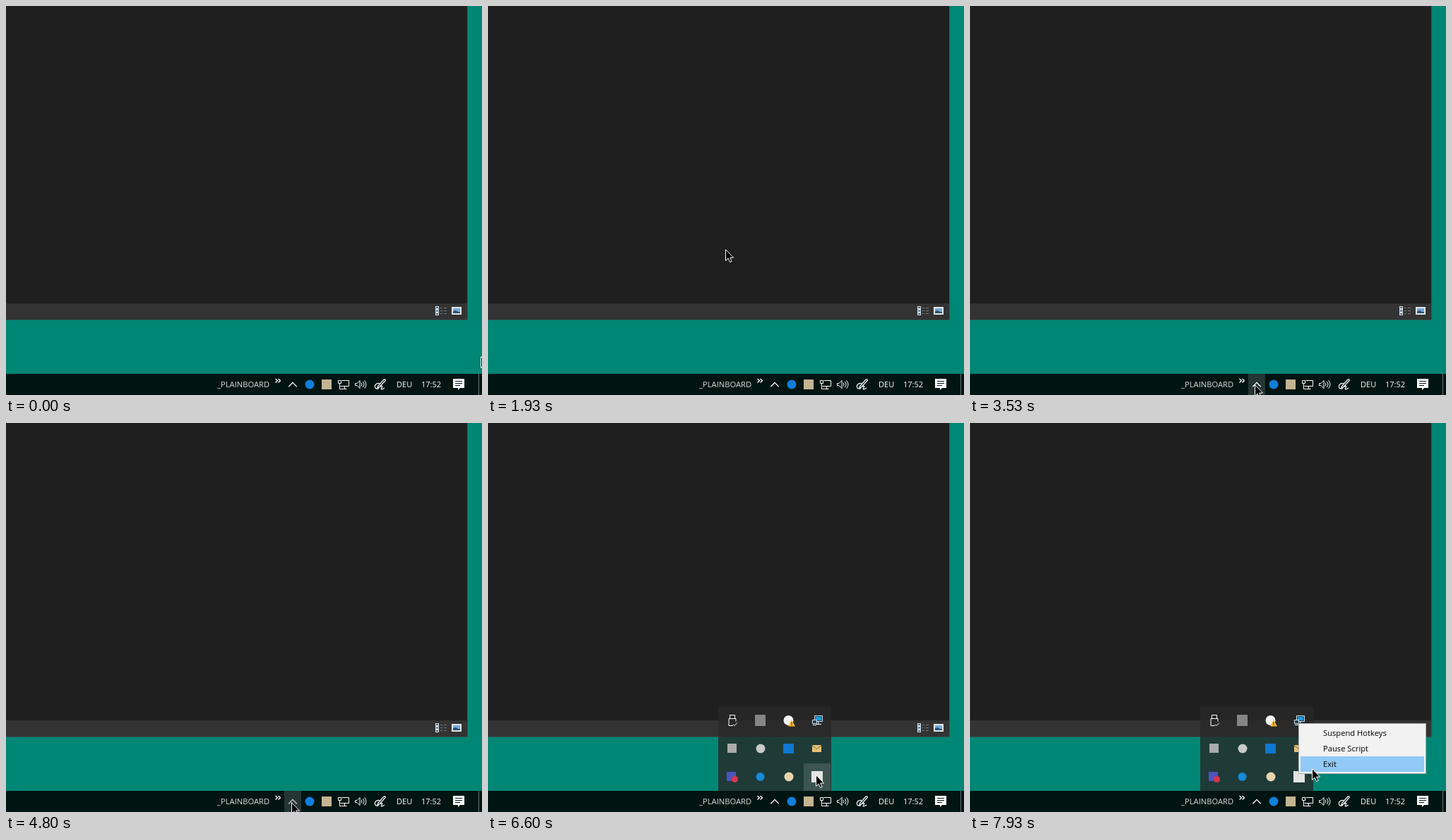
An HTML page that plays this animation: 674 px wide and 552 px high, repeating every 8000 ms.

```html
<!DOCTYPE html>
<html lang="en">
<head>
<meta charset="utf-8">
<title>Closing a script from the tray</title>
<style>
  html, body { margin: 0; width: 100%; height: 100%; overflow: hidden; background: #008675; }
  svg { display: block; }
  text { font: 11.2px "Open Sans", "Noto Sans", sans-serif; }
  rect { shape-rendering: crispEdges; }
  .line { fill: none; stroke: #fff; }
</style>
</head>
<body>
<svg width="674" height="552" viewBox="0 0 674 552">
  <!-- application window -->
  <rect width="653" height="422" fill="#1f1f1f"/>
  <rect y="422" width="653" height="23" fill="#333"/>
  <path d="M0 445.5H653.5V0" fill="none" stroke="#2d5c54"/>
  <g id="viewIcons">
    <path d="M608 426h5v13h-5z" fill="#d9d9d9"/>
    <path d="M609 428h3m-3 4.5h3m-3 4.5h3" stroke="#416f9b" stroke-width="2"/>
    <path d="M615 428.5h3m2 0h4m-9 4h3m2 0h4m-9 4h3m2 0h4" stroke="#777"/>
    <rect x="631" y="427" width="14" height="11" fill="#e6e6e6"/>
    <rect x="633" y="429" width="10" height="7" fill="#75a9dc"/>
    <path d="M633 436v-3l4-1 3 2h3v2z" fill="#245273"/>
  </g>

  <!-- taskbar -->
  <rect y="522" width="674" height="30" fill="#001412"/>
  <rect id="chevronHover" x="394" y="522" width="24" height="30" fill="#fff"/>
  <text x="299" y="541" fill="#dcdcdc">_PLAINBOARD</text>
  <path class="line" d="M381.5 529l3 2.7-3 2.8m4-5.5l3 2.7-3 2.8" stroke-width="1.3"/>
  <path id="chevron" class="line" d="M400.3 540.2l5.7-5.8 5.7 5.8" stroke-width="1.3"/>
  <circle cx="430" cy="537" r="6.5" fill="#0f7fdb"/>
  <rect x="447" y="530" width="14" height="14" fill="#c3b492"/>
  <path class="line" d="M475.5 531.5h10v8h-12M479.5 540v3.5m-4 0h7M470.5 531.5h4v4h-4zM472.5 536v7.5h3"/>
  <path class="line" d="M494.5 535.5h2.5l4-4v11l-4-4h-2.5zM503 534.7q2 2.3 0 4.6M505.3 533q3.4 4 0 8M507.6 531.3q4.8 5.7 0 11.4"/>
  <path class="line" d="M527 539l8-9q2-1 2.3 1.2L529 540.5l-3 1zM529 535.5c-5-1-8 3-6 6.500c2 2 5 1 5-.5m2-1c2-2 4-1 2 1-2 3 0 3 4 .5" stroke-width="1.2"/>
  <text x="553" y="541" fill="#fff" style="font-size:11px">DEU</text>
  <text x="588" y="541" fill="#fff" style="font-size:11px">17:52</text>
  <path d="M633 529h16v13h-6l-3 3v-3h-7z" fill="#fff"/>
  <path d="M636 532.500h10m-10 3h10m-10 3h7" stroke="#001412"/>
  <rect x="669" y="522" width="1" height="30" fill="#687572"/>

  <!-- hidden icons -->
  <g id="flyout">
    <rect x="326" y="402" width="160" height="120" fill="#282828" fill-opacity=".79"/>
    <rect id="cellHover" x="447" y="483" width="38" height="39" fill="#fff" fill-opacity=".13"/>
    <path class="line" d="M342.500 419.500v-5h7v5m-8.500 0h10v4m-10-4v10h6m0-2l2 2 4-4m-8-11h.9m1.200 0h.9"/>
    <rect x="378" y="414" width="15" height="16" fill="#858585"/>
    <circle cx="425.500" cy="422" r="7" fill="#f4f4f4"/>
    <path d="M430 421l5 9.500h-10z" fill="#f6b928"/>
    <path d="M430 424.500v3m0 .8v1" stroke="#333"/>
    <path d="M462.500 415.500h11v8h-11z" fill="#123d61" stroke="#dce6ee"/>
    <path d="M464 417h8v5h-8z" fill="#259bdc"/>
    <path d="M459.500 421.500h6v5h-6z" fill="#17405e" stroke="#dce6ee"/>
    <path d="M468 424v3.500m-3 0h7m-12 1h5" class="line"/>
    <rect x="339" y="455" width="13" height="13" fill="#aaa"/>
    <circle cx="386" cy="462" r="6.500" fill="#c9c9c9"/>
    <rect x="418" y="455" width="15" height="14" fill="#0f78d0"/>
    <path d="M459 457h13v10h-13z" fill="#e5c177"/>
    <path d="M459 457.500l6.500 5 6.500-5" fill="none" stroke="#755b28"/>
    <rect x="338" y="495" width="13" height="13" fill="#4c54bd"/>
    <circle cx="349.500" cy="505.500" r="4.500" fill="#d9344b"/>
    <circle cx="385.500" cy="502" r="6" fill="#168bd8"/>
    <circle cx="426" cy="502" r="6.500" fill="#ead4ad"/>
    <rect x="458" y="494" width="16" height="16" fill="#e4e4e4"/>
  </g>

  <g id="menu">
    <rect x="465" y="426" width="181" height="72" fill="#a9aeac"/>
    <rect x="466" y="427" width="179" height="70" fill="#f2f2f2"/>
    <rect id="exitHover" x="468" y="473" width="175" height="22" fill="#91c9f7"/>
    <text x="500" y="444">Suspend Hotkeys</text>
    <text x="500" y="466">Pause Script</text>
    <text x="500" y="488">Exit</text>
  </g>

  <path id="cursor" d="M.5.7v15.800l3.600-3.400 2.400 5.400 2.600-1.100-2.400-5.300h4.900z" fill="#000" stroke="#fff"/>
</svg>
<script>
  const LOOP = 8000, FPS = 15;
  const el = id => document.getElementById(id);
  const clamp = v => Math.max(0, Math.min(1, v));

  // Pointer tip: [tick, x, y]
  const path = [
    [1, 672, 497], [5, 508, 396], [9, 400, 329], [14, 400, 329],
    [15, 396, 326], [19, 368, 377], [20, 368, 377], [27, 341, 337],
    [29, 336, 345], [38, 415, 531], [40, 421, 539], [41, 420, 542],
    [43, 420, 542], [47, 404, 532], [51, 404, 532], [54, 403, 539],
    [60, 403, 539], [61, 404, 538], [82, 404, 538], [90, 429, 515],
    [95, 450, 508], [99, 464, 499], [115, 464, 499], [119, 484, 490]
  ];

  function pointer(k) {
    const i = path.findIndex(p => p[0] >= k);
    if (i < 0) return path.at(-1).slice(1);
    if (i === 0) return path[0].slice(1);
    const [a, ax, ay] = path[i - 1], [b, bx, by] = path[i];
    const f = (k - a) / (b - a);
    return [ax + (bx - ax) * f, ay + (by - ay) * f].map(Math.round);
  }

  const show = (id, on) => el(id).setAttribute("visibility", on ? "inherit" : "hidden");
  const fade = (id, v) => el(id).setAttribute("opacity", v);

  function draw(now) {
    const k = Math.floor((now % LOOP + 5) * FPS / 1000);
    el("cursor").setAttribute("transform", `translate(${pointer(k)})`);
    fade("chevronHover", .14 * clamp((k - 43) / 4) * clamp((87 - k) / 4));
    fade("chevron", k >= 72 && k < 74 ? .8 : 1);
    show("flyout", k >= 74);
    show("cellHover", k >= 95 && k < 117);
    fade("menu", clamp((k - 101) / 4));
    show("exitHover", k >= 117);
    requestAnimationFrame(draw);
  }
  draw(performance.now());
</script>
</body>
</html>
```
